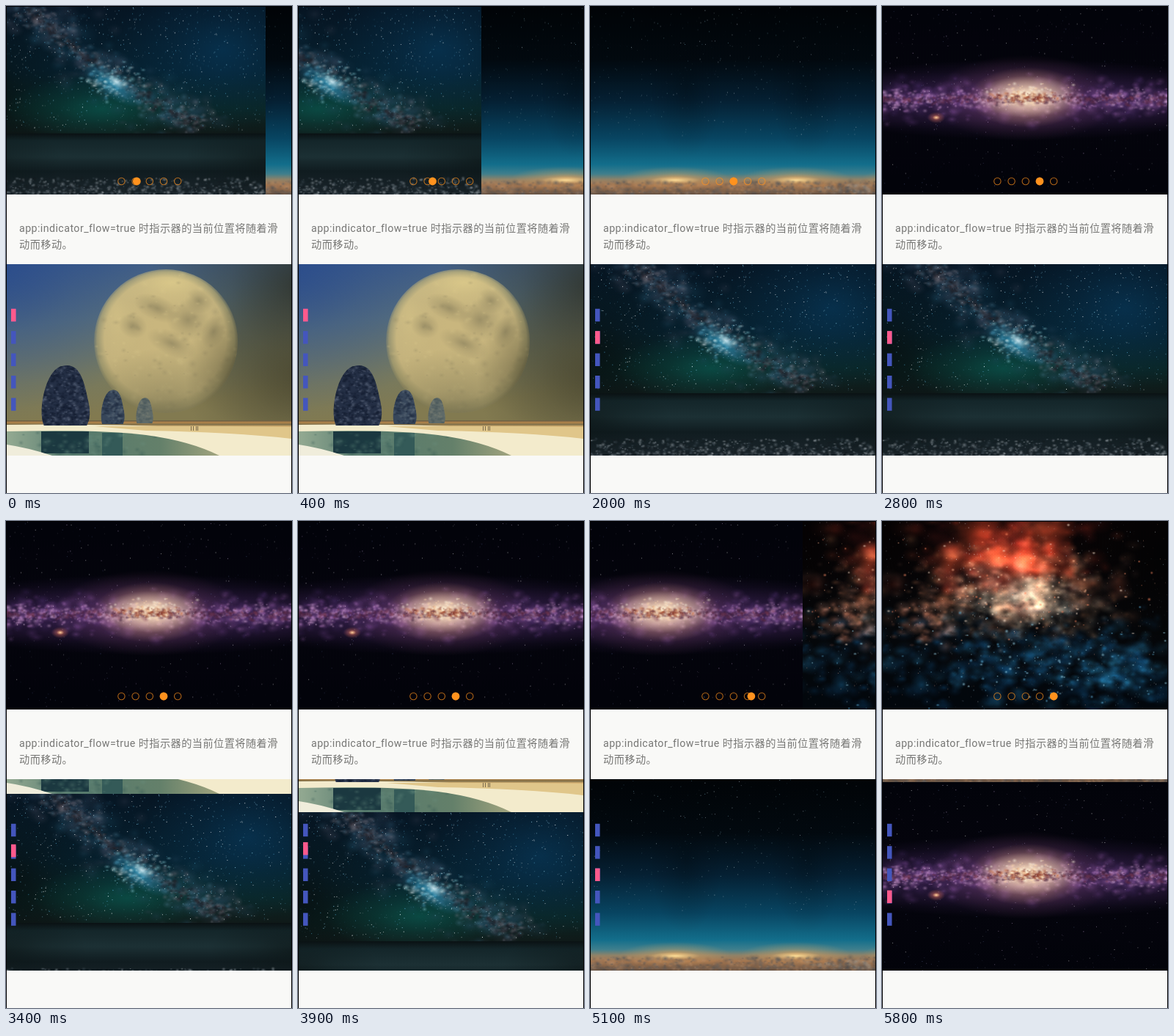
Animation, 390 px wide and 664 px high, one loop 5900 ms. Source, as an HTML page with a canvas:

```html
<!DOCTYPE html>
<html lang="zh-CN">
<head>
<meta charset="utf-8">
<style>
  html, body { margin: 0; width: 100%; height: 100%; overflow: hidden; background: #f9f9f7; }
  canvas { position: absolute; left: 0; top: 0; }
  p {
    position: absolute; left: 18px; top: 293.4px; margin: 0; white-space: nowrap;
    font: 14.2px/21.5px Roboto, "Noto Sans CJK SC", "Noto Sans CJK", sans-serif;
    letter-spacing: .444px; color: #777775;
  }
</style>
</head>
<body>
<canvas id="stage" width="390" height="664"></canvas>
<p>app:indicator_flow=true 时指示器的当前位置将随着滑<br>动而移动。</p>
<script>
const W = 388, H = 261, LOOP = 5900;
const ctx = document.getElementById('stage').getContext('2d');

let seed = 7, g;
const rnd = () => (seed = seed * 16807 % 2147483647) / 2147483647;
const spread = (center, size) => center + (rnd() + rnd() + rnd() - 1.5) * size;
const around = (x, y, w, h) => () => [spread(x, w), spread(y, h)];
const pick = list => list[Math.floor(rnd() * list.length)];

function backdrop(x1, y1, stops, y = 0, h = H) {
  const fill = g.createLinearGradient(0, y, x1, y + y1);
  stops.forEach(([at, color]) => fill.addColorStop(at, color));
  g.fillStyle = fill;
  g.fillRect(0, y, W, h);
}

function glow(x, y, rx, ry, color, alpha = 1, angle = 0) {
  g.save();
  g.translate(x, y);
  g.rotate(angle);
  g.scale(rx, ry);
  g.globalAlpha = alpha;
  const fill = g.createRadialGradient(0, 0, 0, 0, 0, 1);
  fill.addColorStop(0, color);
  fill.addColorStop(.45, color + '70');
  fill.addColorStop(1, color + '00');
  g.fillStyle = fill;
  g.fillRect(-1, -1, 2, 2);
  g.restore();
}

function cloud(n, place, size, colors, alpha) {
  for (let i = 0; i < n; i++) {
    const [x, y] = place(), r = size * (.4 + rnd());
    glow(x, y, r, r * (.5 + rnd() * .5), pick(colors), alpha);
  }
}

function stars(n, height, colors, bright) {
  for (let i = 0; i < n; i++) {
    g.globalAlpha = bright * rnd() ** 3;
    g.fillStyle = pick(colors);
    g.fillRect(rnd() * W, rnd() * height, 1, 1);
  }
  g.globalAlpha = 1;
}

function shape(color, path) {
  g.fillStyle = color;
  g.fill(new Path2D(path));
}

function rock(x, y, w, h, [base, dark, light]) {
  const outline = new Path2D();
  outline.moveTo(x + w * .07, y + h);
  outline.bezierCurveTo(x - w * .06, y + h * .75, x + w * .1, y + h * .12, x + w * .4, y + h * .03);
  outline.bezierCurveTo(x + w * .8, y - h * .08, x + w * .88, y + h * .3, x + w * .96, y + h * .6);
  outline.quadraticCurveTo(x + w * 1.03, y + h * .85, x + w * .93, y + h);
  g.save();
  g.clip(outline);
  g.fillStyle = base;
  g.fillRect(x - 5, y - 5, w + 10, h + 10);
  cloud(w * h / 9, () => [x + rnd() * w, y + rnd() * h], 3.2, [dark, dark, light], .6);
  g.restore();
}

function moonBeach() {
  backdrop(30, 218, [[0, '#39598a'], [.4, '#59707c'], [.75, '#76795f'], [1, '#827a50']]);
  glow(-10, 10, 230, 190, '#27498c', .75);
  glow(400, 30, 210, 210, '#2d332f', .95);
  glow(400, 150, 160, 140, '#4b4830', .85);
  g.save();
  g.beginPath();
  g.arc(217, 105, 98, 0, 7);
  g.clip();
  const light = g.createRadialGradient(212, 85, 10, 217, 105, 99);
  light.addColorStop(0, '#c9b67e');
  light.addColorStop(.82, '#cdb97fe8');
  light.addColorStop(.94, '#b3a670b0');
  light.addColorStop(1, '#a2986820');
  g.fillStyle = light;
  g.fillRect(110, 0, 220, 210);
  glow(225, 25, 85, 35, '#e8d590', .6);
  glow(150, 70, 35, 60, '#d9c688', .5);
  [[205, 60, 34, 17], [247, 76, 30, 27], [172, 84, 20, 17], [262, 50, 20, 17], [225, 108, 36, 17], [282, 92, 16, 24]]
    .forEach(([x, y, rx, ry]) => glow(x, y, rx, ry, '#857c5a', .65, .4));
  cloud(240, around(216, 130, 150, 130), 5, ['#857c5c', '#dfcc8e'], .25);
  glow(216, 215, 150, 100, '#7c7653', 1);
  glow(318, 150, 75, 95, '#625c3e', .95);
  g.restore();
  backdrop(0, 14, [[0, '#5f5844'], [.2, '#b4854a'], [.4, '#80704a'], [.6, '#d7b273'], [1, '#efd9a0']], 213, 48);
  shape('#f3ebcc', 'M0 219Q120 217 240 222T388 226V261H0Z');
  shape('#e0c68a', 'M120 221Q260 220 388 222V238Q310 229 190 227Z');
  g.save();
  g.clip(new Path2D('M0 228Q130 225 190 233Q250 241 290 261H0Z'));
  backdrop(300, 0, [[0, '#94aa92'], [.3, '#55796d'], [.7, '#64806a'], [1, '#a9a981']], 225, 36);
  g.fillStyle = '#1b3840';
  g.fillRect(47, 228, 65, 30);
  g.fillStyle = '#345a58';
  g.fillRect(130, 230, 28, 31);
  cloud(70, () => [spread(100, 100), 230 + rnd() * 30], 6, ['#274d4c', '#6a9182'], .3);
  g.restore();
  shape('#f0eddb', 'M0 246Q28 250 62 261H0Z');
  rock(46, 137, 68, 83, ['#242f45', '#111a2d', '#59647a']);
  rock(128, 171, 33, 47, ['#37465a', '#1f2b3f', '#5f6d78']);
  rock(176, 182, 24, 35, ['#5f6a68', '#485659', '#7d8072']);
  g.fillStyle = '#7a6a4c';
  [251, 254, 258, 260].forEach(x => g.fillRect(x, 221, 1, 6));
}

function milkyWay() {
  backdrop(0, 177, [[0, '#061523'], [.5, '#06202e'], [.8, '#0a2524'], [1, '#101a19']]);
  glow(330, 60, 150, 110, '#083656', .75);
  glow(0, 120, 140, 130, '#070f10', .9);
  glow(165, 142, 130, 50, '#0b4f48', .85);
  const along = width => () => {
    const x = rnd() * 300;
    return [spread(x, width), spread(-60 + x * 1.05 - x * x * .001, width)];
  };
  cloud(330, along(38), 14, ['#2c4860', '#45485a', '#215068'], .22);
  cloud(420, along(19), 5, ['#84818c', '#70656d', '#54829b'], .32);
  cloud(260, along(9), 4.5, ['#15171f', '#241f25'], .5);
  glow(180, 108, 50, 19, '#2488ad', .9, .6);
  cloud(110, around(181, 103, 38, 22), 4, ['#8fd3dd', '#c0cfd2', '#4b9fc0'], .45);
  glow(184, 104, 16, 8, '#d5eef4', .9, .6);
  stars(1800, 172, ['#8ecbe5', '#ffffff', '#4f9fc5'], .9);
  backdrop(0, 85, [[0, '#0a1113'], [.12, '#14262a'], [.38, '#1c3034'], [.62, '#101c20'], [1, '#1b252b']], 176, 85);
  glow(0, 215, 110, 60, '#0b1415', .6);
  glow(388, 215, 110, 60, '#0b1415', .6);
  cloud(800, () => [rnd() * W, 261 - 23 * rnd() ** 1.4], 3, ['#747f87', '#404d56', '#a3abb1', '#12191d', '#12191d'], .5);
}

function horizon() {
  backdrop(0, H, [[0, '#010407'], [.28, '#02090f'], [.5, '#052033'], [.7, '#084562'],
    [.84, '#136e8b'], [.89, '#3f7f8d'], [.92, '#8f8268'], [.95, '#a5764f'], [1, '#675344']]);
  for (let x = -50; x < W + 60; x += 165) {
    glow(x + 15, 110, 50, 100, '#01070c', .3);
    glow(x + 165, 239, 75, 17, '#eca85d', .7);
    glow(x + 165, 241, 34, 5, '#ffe19a', .95);
  }
  cloud(500, () => [rnd() * W, 261 - rnd() * 18], 4.5, ['#8c6a50', '#5b5d61', '#b38a67', '#44494f'], .4);
  cloud(70, () => [spread(360, 70), 247 + rnd() * 13], 5, ['#9a9388', '#474b50'], .4);
  stars(700, 180, ['#5e8795', '#a8b8c0'], .75);
}

function galaxy() {
  backdrop(0, H, [[0, '#02030a'], [.35, '#04040c'], [.5, '#1a1026'], [.65, '#04040c'], [1, '#02030a']]);
  glow(194, 129, 330, 56, '#4a2c68', .85);
  glow(194, 127, 130, 60, '#754064', .8);
  const along = height => () => [rnd() * W, spread(129, height)];
  cloud(550, along(26), 8, ['#774691', '#9a63a9', '#4d2f6d'], .25);
  cloud(620, along(13), 4, ['#e1b3df', '#a972b8', '#c68cc6'], .42);
  glow(197, 126, 80, 42, '#f0b58c', .9);
  glow(197, 125, 68, 29, '#fff0d0', 1);
  cloud(330, along(6.5), 4, ['#4f2038', '#74354b', '#381b35'], .55);
  cloud(150, around(197, 126, 45, 6), 3.5, ['#a14f35', '#c9754b', '#7d332e'], .6);
  cloud(110, around(197, 122, 45, 15), 3, ['#fff6e0', '#ffd9ae'], .55);
  stars(900, H, ['#d2b7e5', '#ffffff', '#5c6a98'], .6);
  glow(73, 154, 12, 8, '#c8664c', .9);
  glow(73, 154, 5, 3, '#ffd5a3', 1);
}

function nebula() {
  backdrop(0, H, [[0, '#080304'], [.5, '#060709'], [1, '#02070d']]);
  g.globalCompositeOperation = 'lighter';
  cloud(230, around(178, 38, 120, 65), 19, ['#a52c18', '#75201a', '#bd4b2c'], .22);
  cloud(330, around(175, 92, 160, 60), 12, ['#835037', '#6a4a3d', '#9c633f'], .24);
  cloud(300, around(195, 112, 95, 48), 11, ['#a59a86', '#7d776a', '#8c7057'], .25);
  cloud(430, around(205, 195, 210, 65), 13, ['#0c3d62', '#0a3354', '#1a5c7e'], .27);
  cloud(90, around(320, 205, 60, 45), 11, ['#104568', '#1f6685'], .3);
  cloud(90, around(65, 135, 45, 36), 9, ['#96573f', '#a8705a'], .28);
  [[95, 50], [168, 52], [235, 10], [135, 14], [220, 60]]
    .forEach(([x, y]) => glow(x, y, 34, 24, '#e84f2b', .5));
  glow(193, 108, 60, 35, '#a89c85', .55);
  g.globalCompositeOperation = 'source-over';
  cloud(260, around(200, 160, 190, 75), 8, ['#08090c', '#0b0b0e'], .4);
  glow(-10, 0, 100, 150, '#040203', 1);
  glow(388, 50, 130, 150, '#030304', 1);
  cloud(170, around(175, 85, 160, 80), 2.2, ['#ffb68d', '#ff8a62', '#ffe4cc'], .7);
  cloud(130, around(220, 195, 220, 60), 2.2, ['#9bd7ed', '#5fb0da'], .7);
  stars(1400, H, ['#e5a584', '#9ccbdf', '#ffffff'], .6);
}

const pages = [moonBeach, milkyWay, horizon, galaxy, nebula].map(paint => {
  const page = document.createElement('canvas');
  page.width = W;
  page.height = H;
  g = page.getContext('2d');
  paint();
  return page;
});

// [time, page position, 1 = settle with ease-out]
const across = [[0, 1.09], [400, 1.358], [900, 2, 1], [2000, 2], [2300, 2.4], [2800, 3, 1],
  [5000, 3], [5100, 3.254], [5500, 4, 1]];
const down = [[1000, 0], [1400, .517], [1900, 1, 1], [3000, 1], [3900, .827], [4000, .8],
  [4300, 1.2], [4900, 2, 1], [5400, 2], [5800, 2.985, 1]];

function position(track, t) {
  const i = track.findIndex(key => key[0] > t);
  if (i < 0) return track[track.length - 1][1];
  if (i === 0) return track[0][1];
  const [t0, v0] = track[i - 1], [t1, v1, settle] = track[i];
  const u = (t - t0) / (t1 - t0);
  return v0 + (v1 - v0) * (settle ? u * (2 - u) : u);
}

function pager(y, height, pos, vertical) {
  ctx.save();
  ctx.beginPath();
  ctx.rect(1, y, W, height);
  ctx.clip();
  pages.forEach((page, i) => {
    const shift = i - pos;
    if (Math.abs(shift) >= 1) return;
    ctx.drawImage(page, 1 + (vertical ? 0 : Math.round(shift * W)),
      y + (vertical ? Math.round(shift * height) : 0), W, height);
  });
  ctx.restore();
}

function dot(pos, filled) {
  ctx.beginPath();
  ctx.arc(157.4 + pos * 19.2, 239, filled ? 5.4 : 4.7, 0, 7);
  filled ? ctx.fill() : ctx.stroke();
}

function bar(pos, color) {
  ctx.fillStyle = color;
  ctx.fillRect(7, 412.8 + pos * 30.4, 6.5, 17.4);
}

function draw(now) {
  const t = Math.floor(now % LOOP / 100) * 100;
  const x = position(across, t), y = position(down, t);
  ctx.fillStyle = '#000';
  ctx.fillRect(0, 0, 390, 664);
  ctx.fillStyle = '#f9f9f7';
  ctx.fillRect(1, 1, W, 663);
  pager(1, 256, x, false);
  pager(352, H, y, true);
  ctx.strokeStyle = 'rgba(255, 146, 30, .68)';
  ctx.lineWidth = 1.1;
  ctx.fillStyle = '#ff921e';
  for (let i = 0; i < 5; i++) dot(i, false);
  dot(x, true);
  for (let i = 0; i < 5; i++) bar(i, '#4456bd');
  bar(y, '#ff5a8c');
}

const start = performance.now();
(function tick() {
  draw(performance.now() - start);
  requestAnimationFrame(tick);
})();
</script>
</body>
</html>
```
